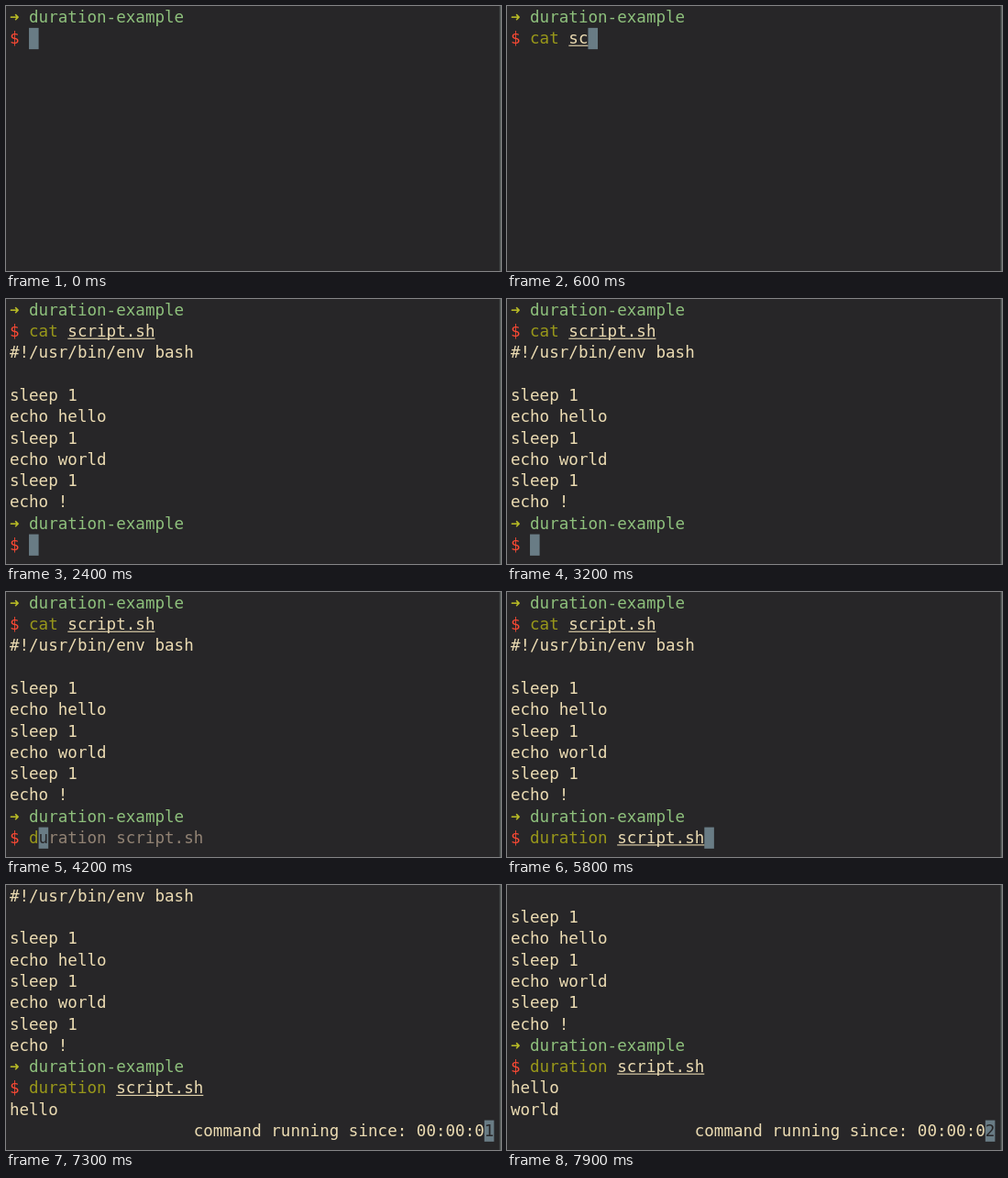
An HTML page with a canvas for the animation above (8 s loop, 540 by 289 pixels).

```html
<!DOCTYPE html>
<html lang="en">
<head>
<meta charset="utf-8">
<title>Terminal session</title>
<style>
html, body { margin: 0; width: 540px; height: 289px; overflow: hidden; background: #272628; }
canvas { display: block; width: 540px; height: 289px; }
</style>
</head>
<body>
<canvas id="stage"></canvas>
<script>
const W = 540, H = 289, LOOP = 8000;
const LEFT = 3.9, TOP = 0.6, CELL_W = 10.57, CELL_H = 23.27, BASELINE = 17.3;
const ROWS = 12, COLS = 50;
const COLOR = {
  back: '#272628', text: '#ebdbb2', command: '#98971a', arrow: '#b8bb26',
  folder: '#8ec07c', dollar: '#fb4934', ghost: '#928374', cursor: '#697c85'
};
const CAT_START = 100, KEY_TIME = 100, CAT_ENTER = 2100;
const RUN_TYPE = 4200, RUN_ACCEPT = 4600, RUN_ENTER = 5900;
const SCRIPT = ['#!/usr/bin/env bash', '', 'sleep 1', 'echo hello',
  'sleep 1', 'echo world', 'sleep 1', 'echo !'];
const OUTPUT = ['hello', 'world'];

const canvas = document.getElementById('stage');
const ctx = canvas.getContext('2d');
const ratio = window.devicePixelRatio || 1;
canvas.width = W * ratio;
canvas.height = H * ratio;
ctx.scale(ratio, ratio);

const colX = col => LEFT + col * CELL_W;
const rowY = row => TOP + row * CELL_H;
const span = (text, color = COLOR.text, underline = false) => ({ text, color, underline });
const folderLine = () => [span('➜', COLOR.arrow), span(' duration-example', COLOR.folder)];

function promptLine(typed, ghost = '') {
  const cut = typed.indexOf(' ') < 0 ? typed.length : typed.indexOf(' ') + 1;
  return [
    span('$ ', COLOR.dollar),
    span(typed.slice(0, cut), COLOR.command),
    span(typed.slice(cut), COLOR.text, true),
    span(ghost, COLOR.ghost)
  ];
}

function buildScreen(t) {
  const keys = Math.max(0, Math.floor((t - CAT_START) / KEY_TIME) + 1);
  const cat = 'cat script.sh'.slice(0, keys);
  const lines = [folderLine(), promptLine(cat)];
  let cursor = { row: 1, col: 2 + cat.length };

  if (t >= CAT_ENTER) {
    const full = 'duration script.sh';
    const count = t < RUN_TYPE ? 0 : t < RUN_ACCEPT ? 1 : full.length;
    const typed = full.slice(0, count);
    lines.push(...SCRIPT.map(line => [span(line)]), folderLine(),
      promptLine(typed, count ? full.slice(count) : ''));
    cursor = { row: lines.length - 1, col: 2 + count };
  }
  if (t >= RUN_ENTER) {
    const seconds = Math.floor((t - RUN_ENTER) / 1000);
    const status = 'command running since: 00:00:' + String(seconds).padStart(2, '0');
    lines.push(...OUTPUT.slice(0, seconds).map(line => [span(line)]));
    lines.push([span(status.padStart(COLS))]);
    cursor = { row: lines.length - 1, col: COLS - 1 };
  }
  const scroll = Math.max(0, lines.length - ROWS);
  cursor.row -= scroll;
  return { lines: lines.slice(scroll), cursor };
}

function drawLine(spans, row, cursor) {
  let col = 0;
  const y = rowY(row);
  for (const { text, color, underline } of spans) {
    if (underline && text) {
      ctx.fillStyle = color;
      ctx.fillRect(colX(col), y + BASELINE + 1.5, text.length * CELL_W, 1.1);
    }
    for (const char of text) {
      const covered = row === cursor.row && col === cursor.col;
      ctx.fillStyle = covered ? COLOR.back : color;
      ctx.fillText(char, colX(col), y + BASELINE);
      col++;
    }
  }
}

function draw(t) {
  const { lines, cursor } = buildScreen(t);
  ctx.fillStyle = COLOR.back;
  ctx.fillRect(0, 0, W, H);
  ctx.fillStyle = '#59605d';
  ctx.fillRect(538.6, 0, 1.4, H);
  ctx.fillStyle = COLOR.cursor;
  ctx.fillRect(colX(cursor.col), rowY(cursor.row), CELL_W, CELL_H);
  ctx.font = '17.55px "DejaVu Sans Mono", monospace';
  ctx.textBaseline = 'alphabetic';
  lines.forEach((line, row) => drawLine(line, row, cursor));
}

const start = performance.now();
function tick() {
  draw((performance.now() - start) % LOOP);
  requestAnimationFrame(tick);
}
tick();
</script>
</body>
</html>
```
